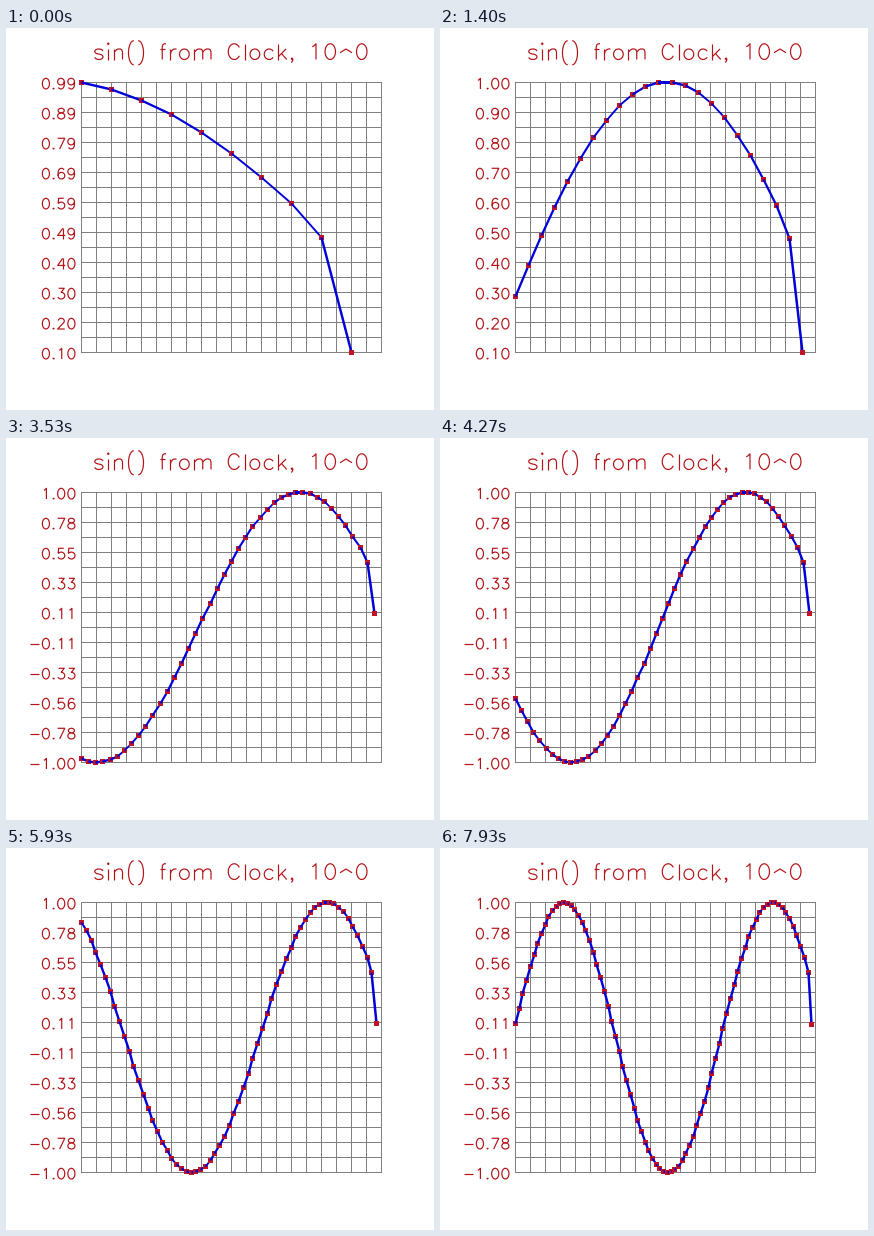
A matplotlib script for the animation above (8 s loop, 428 by 382 pixels).

```python
import numpy as np
import matplotlib.pyplot as plt
from matplotlib.animation import FuncAnimation
from matplotlib.collections import LineCollection, PolyCollection

W, H = 428, 382
LEFT, TOP, RIGHT, BOTTOM = 75, 54, 375, 324
CELL = 15
FPS, FRAMES = 15, 240  # the plot refreshes on every other frame
RED, BLUE, GREY = "#c01424", "#0000d8", "#808080"
TEXT_RED = "#b41418"


# Stroke font: baseline at y = 0, capitals 21 units high.
def arc(cx, cy, rx, ry, start=0, end=360):
    a = np.radians(np.linspace(start, end, 25))
    return np.column_stack([cx + rx * np.cos(a), cy + ry * np.sin(a)])


def path(*xy):
    return np.reshape(np.array(xy, float), (-1, 2))


def join(*parts):
    return np.vstack(parts)


six = join(arc(10.5, 12.5, 6.5, 8.5, 40, 180), arc(10.5, 6.5, 6.5, 6.5, 180, 540))
stem = path(4, 14, 4, 0)
hump = path(4, 10, 7, 13, 9, 14, 12, 14, 14, 13, 15, 10, 15, 0)

# Each glyph: advance width, then its strokes.
GLYPHS = {
    "0": (20, arc(10, 10.5, 7, 10.5)),
    "1": (20, path(6, 17, 8, 18, 11, 21, 11, 0)),
    "2": (20, join(arc(10, 15.5, 6, 5.5, 170, -30), path(3, 0, 17, 0))),
    "3": (20, join(path(5, 21, 16, 21, 10, 13), arc(10, 6.5, 7, 6.5, 80, -155))),
    "4": (20, path(13, 21, 3, 7, 18, 7), path(13, 21, 13, 0)),
    "5": (20, join(path(15, 21, 5, 21, 4, 12), arc(10, 6.75, 7, 6.75, 140, -155))),
    "6": (20, six),
    "7": (20, path(3, 21, 17, 21, 7, 0)),
    "8": (20, arc(10, 16.5, 6, 4.5), arc(10, 6, 7, 6)),
    "9": (20, np.array([20, 21]) - six),
    ".": (10, path(5, 2, 4, 1, 5, 0, 6, 1, 5, 2)),
    ",": (10, path(6, 1, 5, 0, 4, 1, 5, 2, 6, 1, 6, -1, 5, -3, 4, -4)),
    "-": (26, path(4, 9, 22, 9)),
    "^": (22, path(3, 9, 11, 14, 19, 9)),
    "(": (14, arc(11, 9, 7, 16, 90, 270)),
    ")": (14, arc(3, 9, 7, 16, 90, -90)),
    " ": (16,),
    "C": (21, arc(11, 10.5, 8, 10.5, 32, 328)),
    "c": (18, arc(9.5, 7, 6.5, 7, 35, 325)),
    "f": (12, path(10, 21, 8, 21, 6, 20, 5, 17, 5, 0), path(2, 14, 9, 14)),
    "i": (8, path(3, 21, 4, 20, 5, 21, 4, 22, 3, 21), stem),
    "k": (17, path(4, 21, 4, 0), path(14, 14, 4, 4), path(8, 8, 15, 0)),
    "l": (8, path(4, 21, 4, 0)),
    "m": (30, stem, hump, hump + [11, 0]),
    "n": (19, stem, hump),
    "o": (19, arc(9.5, 7, 6.5, 7)),
    "r": (13, stem, path(4, 8, 5, 11, 7, 13, 9, 14, 12, 14)),
    "s": (17, join(arc(8.5, 10.75, 5.5, 3.25, 10, 250),
                   arc(8.5, 3.5, 5.5, 3.5, 70, -170))),
}


def text_width(text, scale):
    return scale * sum(GLYPHS[c][0] for c in text)


def text_strokes(text, x, baseline, scale):
    strokes = []
    for c in text:
        advance, *parts = GLYPHS[c]
        strokes += [p * [scale, -scale] + [x, baseline] for p in parts]
        x += advance * scale
    return strokes


# Clock readings: one early sample, then a slightly uneven ticking.
SAMPLE_NO = [0, 1, 8, 21, 29, 40, 54, 69, 79]
SAMPLE_T = [0.5, 0.63, 1.416, 2.851, 3.743, 4.95, 6.515, 8.211, 9.318]
TIMES = np.append(0.1, np.interp(np.arange(80), SAMPLE_NO, SAMPLE_T))
CLOCK_START = 1.485


def box(x0, y0, x1, y1):
    return path(x0, y0, x1, y0, x1, y1, x0, y1)


def marker(p, r=2.3):
    return p + box(-r, -r, r, r)


def thick_segment(a, b, half=1.25):
    """Line whose thickness is measured along x when steep, else along y."""
    dx, dy = np.abs(b - a)
    n = np.array([half, 0] if dy > dx else [0, half])
    return np.array([a + n, b + n, b - n, a - n])


fig = plt.figure(figsize=(W / 100, H / 100), dpi=100, facecolor="white")
ax = fig.add_axes([0, 0, 1, 1])
ax.set_xlim(-0.5, W - 0.5)
ax.set_ylim(H - 0.5, -0.5)
ax.axis("off")

STROKE = 1.2 * 0.72  # 1.2 pixels in points
grid = [box(x - 0.5, TOP - 0.5, x + 0.5, BOTTOM + 0.5)
        for x in range(LEFT, RIGHT + 1, CELL)]
grid += [box(LEFT - 0.5, y - 0.5, RIGHT + 0.5, y + 0.5)
         for y in range(TOP, BOTTOM + 1, CELL)]
title = text_strokes("sin() from Clock, 10^0", 86, 31, 0.75)
labels = LineCollection([], colors=TEXT_RED, linewidths=STROKE)
curve = PolyCollection([], linewidths=0)
for artist in (PolyCollection(grid, facecolors=GREY, linewidths=0),
               LineCollection(title, colors=TEXT_RED, linewidths=STROKE),
               labels, curve):
    ax.add_collection(artist, autolim=False)


def update(frame):
    clock = (frame + 1) // 2 / FPS + CLOCK_START
    values = np.sin(TIMES[TIMES <= clock][::-1])  # newest sample on the left
    hi, lo = values.max(), values.min()
    x = LEFT + (RIGHT - LEFT) * np.arange(len(values)) / len(values)
    y = TOP + (BOTTOM - TOP) * (hi - values) / (hi - lo)
    points = np.round(np.column_stack([x, y]))

    # Each marker is followed by the segment that leaves it.
    shapes = [marker(points[0])]
    for a, b in zip(points, points[1:]):
        shapes += [thick_segment(a, b), marker(b)]
    curve.set_verts(shapes)
    curve.set_facecolor([RED if i % 2 == 0 else BLUE for i in range(len(shapes))])

    strokes = []
    for i, v in enumerate(np.linspace(hi, lo, 10)):
        text = f"{v:.2f}"
        start = 70 - text_width(text, 0.51)
        strokes += text_strokes(text, start, 60.5 + 30 * i, 0.51)
    labels.set_segments(strokes)
    return curve, labels


anim = FuncAnimation(fig, update, frames=FRAMES, interval=8000 / FRAMES,
                     init_func=lambda: update(0), repeat=True, repeat_delay=0,
                     blit=False)
plt.show()
```
